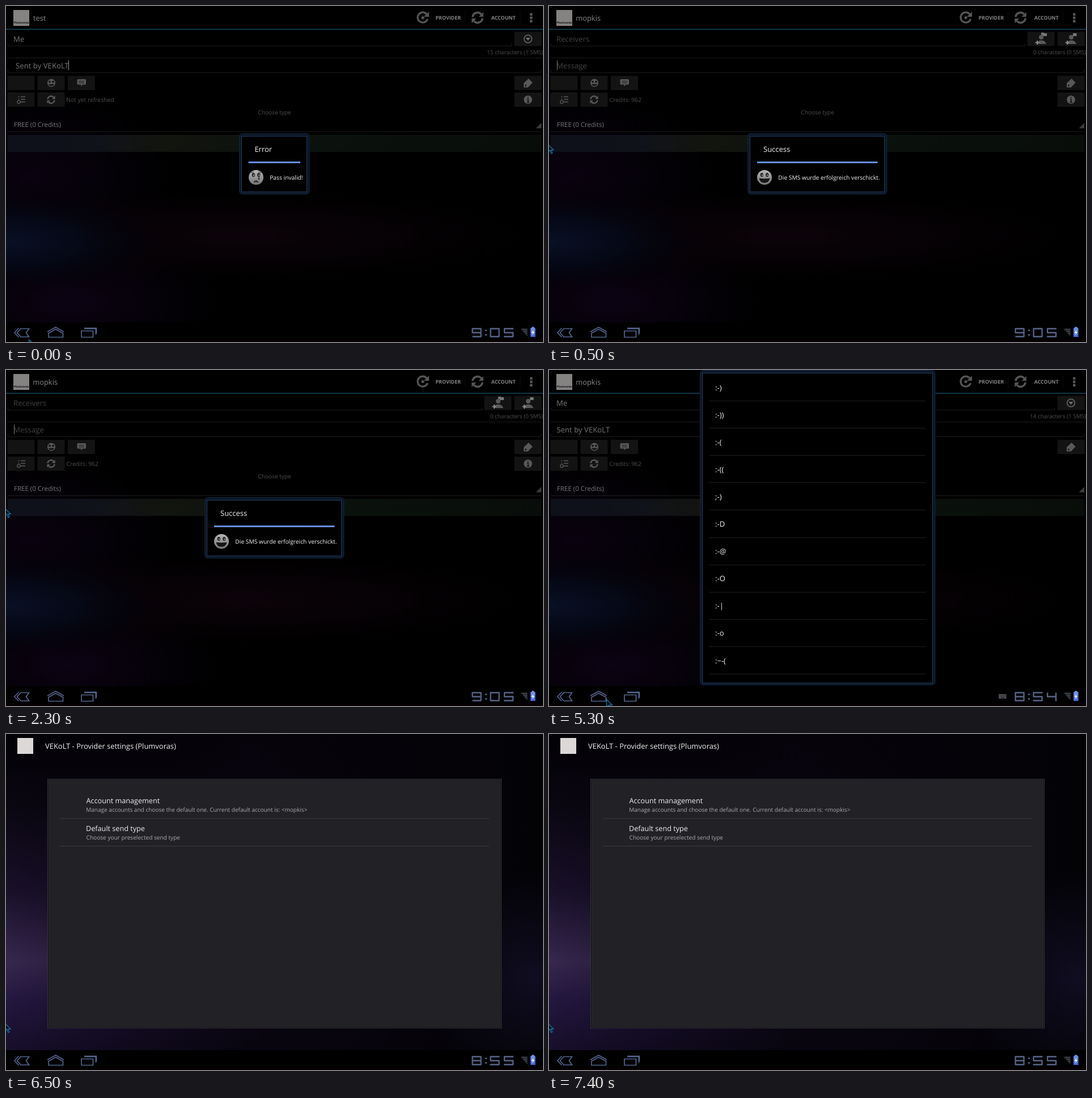
An HTML page for the animation above (8 s loop, 947x592 px).

```html
<!DOCTYPE html>
<html lang="en">
<head>
<meta charset="utf-8">
<title>Messaging app tour</title>
<style>
html, body { margin: 0; width: 100%; height: 100%; overflow: hidden; background: #000; }
svg { display: block; width: 947px; height: 592px; font-family: "Open Sans", "Noto Sans", sans-serif; text-rendering: geometricPrecision; }

/* Scenes: a 0-500, b 500-3500, c 3500-6500, d 6500-8000 ms */
.a, .b, .c, .d, .ab, .ac, .bc, .abc { opacity: 0; animation: 8s step-end infinite; }
.a { animation-name: a; }
.b { animation-name: b; }
.c { animation-name: c; }
.d { animation-name: d; }
.ab { animation-name: ab; }
.ac { animation-name: ac; }
.bc { animation-name: bc; }
.abc { animation-name: abc; }
@keyframes a { 0% { opacity: 1 } 6.25%, 100% { opacity: 0 } }
@keyframes b { 0% { opacity: 0 } 6.25% { opacity: 1 } 43.75%, 100% { opacity: 0 } }
@keyframes c { 0% { opacity: 0 } 43.75% { opacity: 1 } 81.25%, 100% { opacity: 0 } }
@keyframes d { 0% { opacity: 0 } 81.25%, 100% { opacity: 1 } }
@keyframes ab { 0% { opacity: 1 } 43.75%, 100% { opacity: 0 } }
@keyframes ac { 0% { opacity: 1 } 6.25% { opacity: 0 } 43.75% { opacity: 1 } 81.25%, 100% { opacity: 0 } }
@keyframes bc { 0% { opacity: 0 } 6.25% { opacity: 1 } 81.25%, 100% { opacity: 0 } }
@keyframes abc { 0% { opacity: 1 } 81.25%, 100% { opacity: 0 } }

.head { font-size: 12.9px; fill: #858585; }
.act { font-size: 8.9px; font-weight: 700; fill: #858585; }
.edit { font-size: 13.2px; fill: #757575; }
.hint { fill: #424242; }
.small { font-size: 10.2px; fill: #4e4e4e; }
.count { font-size: 9.95px; text-anchor: end; }
.rule { fill: none; stroke: #1b1b1b; }
.btn { fill: #121312; stroke: #1a1b1a; stroke-width: .6; }
.icon { fill: #595959; }
.line { fill: none; stroke: #595959; stroke-width: 2; }
.glow { fill: #0b1522; stroke: #0e2034; stroke-width: 2; }
.box { fill: #000; stroke: #223d61; }
.bar { fill: #6a8de6; }
.title { font-size: 13px; fill: #f2f2f2; }
.body { font-size: 10.27px; fill: #f4f4f4; }
.pref { font-size: 12.65px; fill: #f0f0f0; }
.sub { font-size: 10.05px; fill: #acacac; }
.nav { fill: none; stroke: #56658f; stroke-width: 1.7; }
.clock { fill: none; stroke: #59648a; stroke-width: 2.3; stroke-linejoin: round; }
</style>
</head>
<body>
<svg viewBox="0 0 947 592">
<defs>
  <radialGradient id="blue"><stop offset="0" stop-color="#0a1026"/><stop offset=".5" stop-color="#050a1a" stop-opacity=".75"/><stop offset="1" stop-color="#020410" stop-opacity="0"/></radialGradient>
  <radialGradient id="plum"><stop offset="0" stop-color="#10041a"/><stop offset="1" stop-color="#10041a" stop-opacity="0"/></radialGradient>
  <radialGradient id="wine"><stop offset="0" stop-color="#0b0309"/><stop offset="1" stop-color="#0b0309" stop-opacity="0"/></radialGradient>
  <linearGradient id="send"><stop offset="0" stop-color="#0e101a"/><stop offset=".16" stop-color="#10121a"/><stop offset=".3" stop-color="#12140e"/><stop offset=".6" stop-color="#0a120d"/><stop offset="1" stop-color="#090d0a"/></linearGradient>
  <linearGradient id="side" x2="0" y2="1"><stop offset="0" stop-color="#020104"/><stop offset=".25" stop-color="#0b0713"/><stop offset=".5" stop-color="#19102a"/><stop offset=".72" stop-color="#37274f"/><stop offset=".84" stop-color="#241740"/><stop offset="1" stop-color="#170e2b"/></linearGradient>
  <linearGradient id="fade"><stop offset="0" stop-color="#030206" stop-opacity="0"/><stop offset=".45" stop-color="#07040c" stop-opacity=".88"/><stop offset="1" stop-color="#030205"/></linearGradient>
  <radialGradient id="right"><stop offset="0" stop-color="#0f0d20"/><stop offset="1" stop-color="#0f0d20" stop-opacity="0"/></radialGradient>
  <linearGradient id="skin" x2="0" y2="1"><stop offset="0" stop-color="#b4b4b4"/><stop offset="1" stop-color="#757575"/></linearGradient>
  <linearGradient id="cell" x2="0" y2="1"><stop offset="0" stop-color="#7c98f4"/><stop offset="1" stop-color="#4268dc"/></linearGradient>

  <path id="cursor" d="M0 0V13L3.3 10.2 6 16 8 15 5.5 9.6H10Z" fill="#02080c" stroke="#157fae" stroke-width="1.2"/>
  <rect id="btn" class="btn" width="47" height="24"/>
  <g id="sync" fill="none" stroke="currentColor">
    <path d="M-8-1A8 8 0 0 1 6-5.5M8 1A8 8 0 0 1-6 5.5" stroke-width="3.2"/>
    <path d="M9.5-9V-1.5H2ZM-9.5 9V1.5H-2Z" fill="currentColor" stroke="none"/>
  </g>
  <g id="person">
    <circle cx="921" cy="55" r="4" class="icon"/>
    <path d="M913 67Q914 60.5 921 60.5T930 67Z" class="icon"/>
    <path d="M914 61V68M910.5 64.5H917.5" class="line" style="stroke:#8a8a8a"/>
  </g>
  <g id="face">
    <circle r="13" fill="url(#skin)"/>
    <ellipse cx="-4.7" cy="-4.5" rx="2.6" ry="3.6" fill="#222"/>
    <ellipse cx="4.7" cy="-4.5" rx="2.6" ry="3.6" fill="#222"/>
    <circle cx="-4.2" cy="-4" r="1" fill="#ccc"/><circle cx="5.2" cy="-4" r="1" fill="#ccc"/>
  </g>
  <path id="n0" d="M1 0H16V14H1Z"/>
  <path id="n4" d="M1 0V7H17M16 0V15"/>
  <path id="n5" d="M17 0H1V7H16V14H0"/>
  <path id="n8" d="M1 0H16V14H1ZM1 7H16"/>
  <path id="n9" d="M16 7H1V0H16V14H1"/>
</defs>

<rect width="947" height="592"/>

<g class="abc">
  <ellipse cx="40" cy="300" rx="260" ry="150" fill="url(#plum)" opacity=".6"/>
  <ellipse cx="110" cy="520" rx="270" ry="110" fill="url(#plum)" opacity=".75"/>
  <ellipse cx="420" cy="405" rx="520" ry="80" fill="url(#wine)"/>
  <ellipse cx="0" cy="415" rx="270" ry="85" fill="url(#blue)"/>

  <rect x="13" y="7" width="28" height="28" fill="#858282"/>
  <text x="27" y="31" text-anchor="middle" font-size="5" font-weight="700" fill="#111">Plumvoras</text>
  <path d="M0 41H947" stroke="#12475c" stroke-width="1.6"/>
  <g color="#555">
    <path d="M742 14.5A9 9 0 1 0 743.5 23" fill="none" stroke="currentColor" stroke-width="3.2"/>
    <path d="M746 10V19H737Z" fill="currentColor"/><circle cx="735" cy="20.5" r="2.6" fill="currentColor"/>
    <use href="#sync" transform="translate(831.5 20.5) scale(1.08)"/>
    <path d="M924 12.5h4.4v4.4h-4.4zM924 18.5h4.4v4.4h-4.4zM924 24.5h4.4v4.4h-4.4z" fill="currentColor"/>
  </g>
  <path d="M809.5 10V31M906.5 10V31" stroke="#0d0d0d"/>
  <text class="act" x="757.5" y="23.7">PROVIDER</text>
  <text class="act" x="855.7" y="23.7">ACCOUNT</text>

  <path class="rule" d="M3.5 112V117.5H943.5V112M3 91.5H944M3 221.5H944"/>
  <use href="#btn" x="3" y="123.5"/><use href="#btn" x="56" y="123.5"/><use href="#btn" x="109.500" y="123.5"/>
  <use href="#btn" x="897" y="123.5"/><use href="#btn" x="3" y="153"/><use href="#btn" x="56" y="153"/>

  <circle class="icon" cx="80" cy="135.500" r="7"/>
  <g fill="#151515"><circle cx="77" cy="133.500" r="2"/><circle cx="83" cy="133.500" r="2"/><path d="M75 137.500H85Q84 141 80 141T75 137.500Z"/></g>
  <path class="icon" d="M127 129H139.500Q141 129 141 130.500V137Q141 138.500 139.500 138.500H135L132.500 142V138.500H127Q125.500 138.500 125.500 137V130.500Q125.500 129 127 129Z"/>
  <path d="M128.500 132.500H138M128.500 135.500H138" stroke="#151515"/>
  <path class="icon" d="M913 143.500V136L921.500 128 928.500 135 920.500 143.500Z"/><circle cx="916.500" cy="140" r="1.500" fill="#151515"/>
  <path class="line" style="stroke-width:1.5" d="M26 160H34M26 164.500H34M26 169H34M21.500 160H23.500M21.500 164H23.500"/>
  <circle class="line" style="stroke-width:1.300" cx="22.500" cy="169" r="2.700"/>
  <use href="#sync" transform="translate(79.500 165) scale(.75)" color="#595959"/>

  <text x="14" y="213" font-size="11.5" fill="#777">FREE (0 Credits)</text>
  <path d="M944 206V215.500H934.500Z" fill="#3b3b3b"/>
  <rect x="3" y="227" width="941" height="30" fill="url(#send)"/>
</g>

<g class="ac">
  <path class="rule" d="M3.500 66V70.500H891.500V66"/>
  <text class="edit" x="13" y="63">Me</text>
  <use href="#btn" x="897" y="46"/>
  <circle class="line" cx="920.500" cy="58" r="6.800"/><path d="M916.500 56H924.500L920.500 61Z" fill="#707070"/>
</g>
<g class="ab">
  <use href="#btn" x="897" y="153"/>
  <circle class="icon" cx="920.500" cy="165" r="7.300"/>
  <path d="M920.500 160V162.200M919 164.500H920.800V169.500M918.500 169.500H922.800" fill="none" stroke="#151515" stroke-width="1.800"/>
  <text class="small" x="473.500" y="191" text-anchor="middle" style="font-size:10.1px">Choose type</text>
</g>
<g class="bc">
  <text class="head" x="47.200" y="25.500">mopkis</text>
  <text class="small" x="106.500" y="169">Credits: 962</text>
</g>

<g class="a">
  <text class="head" x="48" y="25.500">test</text>
  <text class="small count" x="947" y="85">15 characters (1 SMS)</text>
  <text class="edit" x="17" y="109.500">Sent by VEKoLT</text>
  <path d="M110.500 96V113" stroke="#999"/>
  <text class="small" x="106" y="169" style="font-size:10.400px">Not yet refreshed</text>
  <rect class="glow" x="412" y="225" width="122.500" height="106" rx="5"/>
  <rect class="box" x="415.500" y="229.500" width="115" height="98"/>
  <text class="title" x="438.400" y="257">Error</text>
  <rect class="bar" x="427.500" y="274" width="91.500" height="3"/>
  <g transform="translate(441 302)">
    <use href="#face"/>
    <path d="M-4 8.500Q0 3.500 4 8.500" fill="#3a3a3a" stroke="#222" stroke-width="1.300"/>
    <path d="M-9-8L-4-10M9-8L4-10" stroke="#333"/>
    <path d="M5-1Q7.500 3 5 4.500 2.500 3 5-1Z" fill="#222"/>
  </g>
  <text class="body" x="465.200" y="305.700">Pass invalid!</text>
</g>

<g class="b">
  <path class="rule" d="M3.500 66V70.500H839.500V66"/>
  <text class="edit hint" x="13" y="63">Receivers</text>
  <use href="#btn" x="844" y="46"/><use href="#btn" x="897" y="46"/>
  <use href="#person" x="-53"/><use href="#person"/>
  <path class="icon" style="fill:#777" d="M871 48h7v5h-7zM868 47h5v4h-5zM924 48h6.500v5h-6.500z"/>
  <text class="small count" x="947" y="85">0 characters (0 SMS)</text>
  <text class="edit hint" x="13" y="109.500">Message</text>
  <path d="M14.500 96V113" stroke="#777"/>
  <rect class="glow" x="351" y="225" width="244.500" height="106" rx="5"/>
  <rect class="box" x="354.500" y="229.500" width="237" height="98"/>
  <text class="title" x="378" y="257">Success</text>
  <rect class="bar" x="367" y="274" width="212.500" height="3"/>
  <g transform="translate(380 302)">
    <use href="#face"/>
    <path d="M-9.500 1.500Q0 3 9.500 1.500 8 9.500 0 9.500T-9.500 1.500Z" fill="#161616"/>
  </g>
  <text class="body" x="404.300" y="305.700">Die SMS wurde erfolgreich verschickt.</text>
</g>

<g class="c">
  <text class="small count" x="947" y="85">14 characters (1 SMS)</text>
  <text class="edit" x="13.400" y="109.500">Sent by VEKoLT</text>
  <rect class="glow" x="267" y="1" width="413.500" height="553.500" rx="5"/>
  <rect class="box" x="270.500" y="5.500" width="406" height="546"/>
  <g id="list"></g>
</g>

<g class="d">
  <rect width="947" height="557" fill="url(#side)"/>
  <rect width="947" height="557" fill="url(#fade)"/>
  <ellipse cx="930" cy="430" rx="200" ry="190" fill="url(#right)"/>
  <rect x="20" y="7" width="28" height="28" fill="#dcd8d8"/>
  <text x="69" y="25.500" font-size="12.95" fill="#f0f0f0">VEKoLT - Provider settings (Plumvoras)</text>
  <rect x="73.500" y="79.500" width="800" height="438.500" fill="#08080b" stroke="#3a3a40"/>
  <rect x="75.500" y="81.500" width="796" height="434.500" fill="#212126" stroke="#2b2b30"/>
  <text class="pref" x="141.500" y="122">Account management</text>
  <text class="sub" x="141.200" y="136.800">Manage accounts and choose the default one. Current default account is: &lt;mopkis&gt;</text>
  <text class="pref" x="141" y="171">Default send type</text>
  <text class="sub" x="141.500" y="185.800" style="font-size:10.120px">Choose your preselected send type</text>
  <path d="M95 149H852M95 197.500H852" stroke="#3b3b40"/>
</g>

<rect y="557" width="947" height="35"/>
<rect y="589" width="947" height="3" fill="#080004"/>
<g class="nav">
  <path d="M22.500 567.500L15 575.500 22.500 583.500M26 568.500H40.500L35.500 575.500 40.500 583H26L19.500 575.500Z"/>
  <path d="M73 574L87.500 566 102 574M75 576.500V583.500H100.500V576.500L87.500 569.500Z"/>
  <path d="M133 572.500H153.500V583.500H133ZM138.500 568.500H158.500V579"/>
  <path d="M138 568H159V577" stroke-width="2.400"/>
</g>
<g class="clock">
  <path d="M845.500 571h2v1h-2zM845.500 579h2v1h-2z" stroke-width="1.500"/>
  <g class="ab"><use href="#n9" x="821.500" y="568.500"/><use href="#n0" x="853.500" y="568.500"/><use href="#n5" x="878" y="568.500"/></g>
  <g class="c"><use href="#n8" x="821.500" y="568.500"/><use href="#n5" x="853.500" y="568.500"/><use href="#n4" x="878" y="568.500"/></g>
  <g class="d"><use href="#n8" x="821.500" y="568.500"/><use href="#n5" x="853.500" y="568.500"/><use href="#n5" x="878" y="568.500"/></g>
</g>
<path d="M908 568.500H919.500V582Z" fill="#3c3f47"/>
<path d="M908 571.500H920M911 575H920M914 578.500H920" stroke="#15161a"/>
<path d="M927 565.500H931.500V567.500H933.500V583H925V567.500H927Z" fill="url(#cell)"/>
<path d="M930.500 570L926.500 576H929L928 580.500 932 574.500H929.500Z" fill="#fff"/>

<g class="c">
  <rect x="793" y="571" width="13.500" height="8" rx="1" fill="#4d4f55"/>
  <path d="M794.500 573H805.500M794.500 575H805.500" stroke="#111" stroke-dasharray="1 1"/><path d="M797 577.300H803" stroke="#111"/>
  <use href="#cursor" x="101.500" y="580.500"/>
</g>
<use class="a" href="#cursor" x="40.500" y="588"/>
<use class="b" href="#cursor" x="-2" y="244"/>
<use class="d" href="#cursor" x="-2" y="510"/>
</svg>
<script>
const smileys = [":-)", ":-))", ":-(", ":-((", ";-)", ":-D", ":-@", ":-O", ":-|", ":-o", ":~-("];
document.getElementById("list").innerHTML = smileys.map((s, i) => {
  const y = i * 48.1;
  return `<text class="title" x="293" y="${35.5 + y}">${s}</text>
    <path d="M282 ${Math.round(54 + y) + .5}H664" stroke="#1d1d1d"/>`;
}).join("");
</script>
</body>
</html>
```
